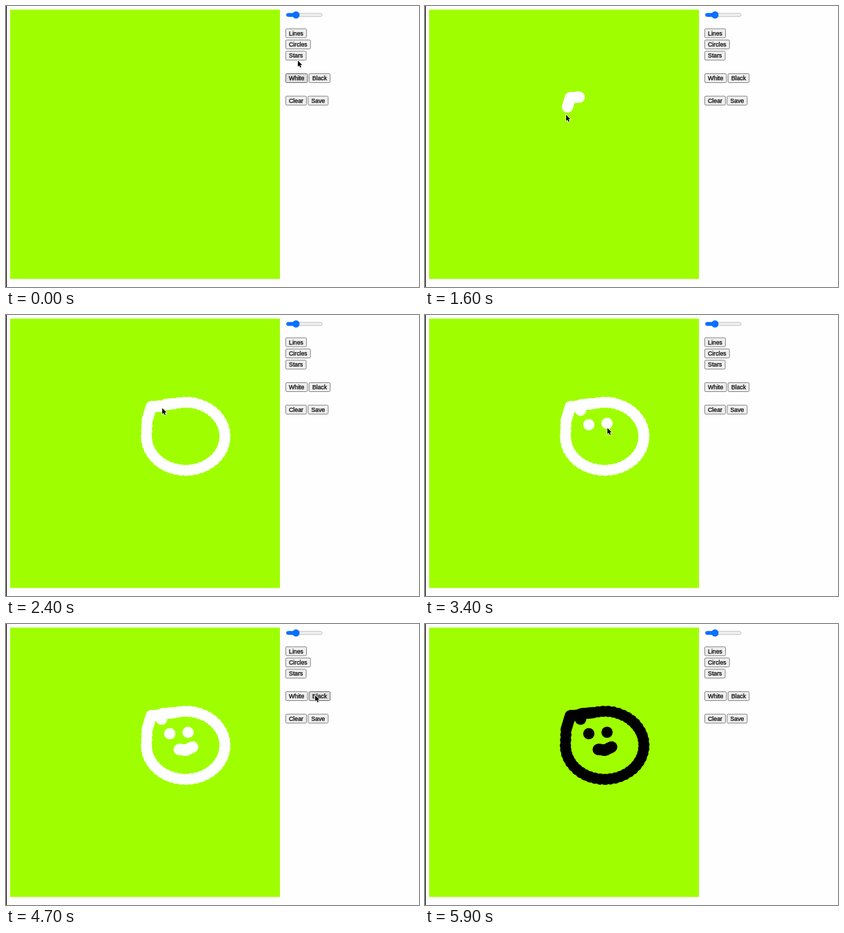
These frames come from a looping animation (600 by 409 pixels, 6800 ms). An HTML page with a canvas:

```html
<!DOCTYPE html>
<html lang="en">
<head>
<meta charset="utf-8">
<title>Paint demo</title>
<style>
  html, body { margin: 0; overflow: hidden; background: #fefefe; }
  canvas { display: block; }
</style>
</head>
<body>
<canvas id="stage" width="600" height="409"></canvas>
<script>
const ctx = document.getElementById('stage').getContext('2d');
const LOOP = 6800, STEP = 100, LAG = 20;
const PEN_TICK = 1000 / 60, PEN_RISE = 4.4, PEN_RADIUS = 8.2;
const BLACK_AT = 4800, CURSOR_END = 5900;
const BLUE = '#0a70ff';

// The pointer's journey is a chain of legs; the pen is down on some of them.
const legs = [];
let clock = -LAG, spot = [422, 105];

function addLeg(end, path, pen) {
  legs.push({ start: clock, end, path, pen });
  clock = end;
  spot = path(1);
}
function line(to, ease) {
  const from = spot;
  return u => from.map((v, i) => v + (to[i] - v) * ease(u));
}
const move = (end, ...to) => addLeg(end, line(to, u => u * u * (3 - 2 * u)), false);
const draw = (end, ...to) => addLeg(end, line(to, u => u), true);
const rest = end => move(end, ...spot);
const dot = () => draw(clock + LAG, ...spot);
function drawArc(end, cx, cy, rx, ry, from, to) {
  addLeg(end, u => {
    const a = from + (to - from) * u;
    return [cx + rx * Math.cos(a), cy + ry * Math.sin(a)];
  }, true);
}

// Pick the circle brush
move(0, 424, 79);
move(400, 420, 57);
rest(660);
// Outline of the face
move(1300, 224, 137);
draw(1500, 211, 138);
draw(1600, 205, 158);
draw(1650, 204, 181);
drawArc(2280, 261, 181, 57, 49.5, Math.PI, -1.85);
draw(2400, 227, 135);
draw(2500, 226, 143);
rest(2700);
// Eyes
move(2900, 238, 164);
dot();
move(3300, 264.5, 162);
dot();
move(3400, 265, 164);
// Mouth
move(3680, 251.5, 187);
draw(3900, 262, 188);
draw(4080, 272, 183);
rest(4200);
// Black, then Save
move(4720, 450, 103);
rest(5200);
move(5500, 474, 125);
move(5800, 458, 138);

const legAt = t => legs.find(leg => t < leg.end) || legs[legs.length - 1];

function pointerAt(t) {
  const { start, end, path } = legAt(t);
  return path(Math.min(1, (t - start) / (end - start)));
}

function disc(x, y, r, fill) {
  ctx.fillStyle = fill;
  ctx.beginPath();
  ctx.arc(x, y, r, 0, 2 * Math.PI);
  ctx.fill();
}

function box(x, y, w, h, r, fill, border) {
  ctx.beginPath();
  ctx.roundRect(x, y, w, h, r);
  ctx.fillStyle = fill;
  ctx.fill();
  ctx.strokeStyle = border;
  ctx.lineWidth = 0.8;
  ctx.stroke();
}

function drawPaint(t) {
  const color = t < BLACK_AT ? '#fff' : '#000';
  for (let s = 0; s <= t - LAG; s += PEN_TICK) {
    if (!legAt(s).pen) continue;
    const [x, y] = pointerAt(s);
    disc(x, y - PEN_RISE, PEN_RADIUS, color);
  }
}

function drawSlider() {
  box(407.5, 10.7, 51.8, 4.6, 2.3, '#efefef', '#b8b8b8');
  box(407.5, 10.7, 14, 4.6, 2.3, BLUE, BLUE);
  disc(421.3, 13, 5.2, BLUE);
}

const rows = [['Lines'], ['Circles'], ['Stars'], [], ['White', 'Black'], [], ['Clear', 'Save']];

function drawButtons(t) {
  const [px, py] = pointerAt(t - LAG);
  ctx.font = '8.7px "Liberation Sans", Arial, sans-serif';
  ctx.textAlign = 'center';
  rows.forEach((labels, row) => {
    const y = 39.6 + row * 16.35;
    let x = 406;
    for (const label of labels) {
      const w = ctx.measureText(label).width + 10.2;
      const hover = t < CURSOR_END && px > x && px < x + w && Math.abs(py - y) < 7;
      box(x + 0.4, y - 6.5, w - 0.8, 13, 1.6, hover ? '#dedede' : '#efefef', hover ? '#4f4f4f' : '#6b6b6b');
      ctx.fillStyle = ctx.strokeStyle = '#000';
      ctx.lineWidth = 0.25;
      ctx.fillText(label, x + w / 2, y + 3);
      ctx.strokeText(label, x + w / 2, y + 3);
      x += w + 1.5;
    }
  });
}

const arrow = new Path2D('M0 .6V9.2L2 7.4L3.4 10.6L4.9 9.9L3.5 6.8H6.2Z');

function drawCursor(t) {
  ctx.save();
  ctx.translate(...pointerAt(t));
  ctx.strokeStyle = '#fff';
  ctx.lineWidth = 1.4;
  ctx.stroke(arrow);
  ctx.fillStyle = '#000';
  ctx.fill(arrow);
  ctx.restore();
}

function fillRect(color, ...rect) {
  ctx.fillStyle = color;
  ctx.fillRect(...rect);
}

function render(elapsed) {
  const t = Math.floor(elapsed % LOOP / STEP) * STEP;
  fillRect('#fefefe', 0, 0, 600, 409);
  fillRect('#000', 0, 0, 1, 409);
  fillRect('#9fff00', 6, 5.3, 392, 392);
  drawPaint(t);
  drawSlider();
  drawButtons(t);
  if (t < CURSOR_END) drawCursor(t);
}

const begin = performance.now();
function tick() {
  render(performance.now() - begin);
  requestAnimationFrame(tick);
}
tick();
</script>
</body>
</html>
```
